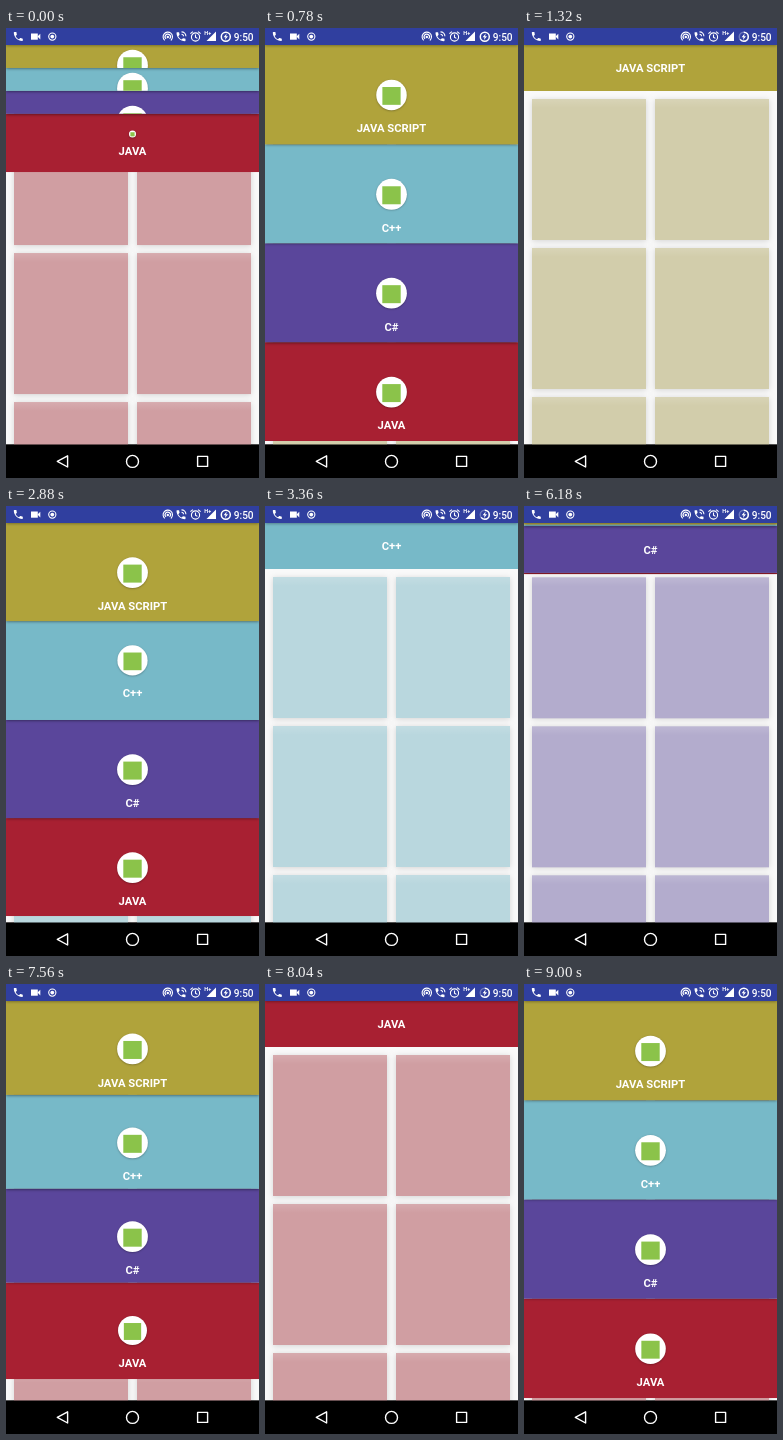
Recreate the animation shown at these times as an HTML page with a canvas. Size 253 by 450 pixels, loop 9060 ms.

```html
<!DOCTYPE html>
<html lang="en">
<head>
<meta charset="utf-8">
<title>Expanding panels</title>
<style>
  html, body { margin: 0; width: 100%; height: 100%; overflow: hidden; background: #000; }
  canvas { display: block; width: 253px; height: 450px; }
</style>
</head>
<body>
<canvas id="stage"></canvas>
<script>
const W = 253, H = 450, LOOP = 9060, STEP = 60;
const TOP = 17, BOTTOM = 416.5, CX = 126.5;
const FULL = 99.85, HEADER = 46;
const FONT = 'Roboto, Arial, sans-serif';

const panels = [
  { title: 'JAVA SCRIPT', color: '#b0a33b', card: '#d2cdab' },
  { title: 'C++', color: '#77b9c8', card: '#b9d7de' },
  { title: 'C#', color: '#5a469b', card: '#b3accd' },
  { title: 'JAVA', color: '#a82032', card: '#d09ea2' }
];

// start, end, panel, opening
const moves = [
  [-182, 390, 3, false],
  [745, 1310, 0, true], [1820, 2330, 0, false],
  [2835, 3365, 1, true], [3915, 4425, 1, false],
  [4995, 5630, 2, true], [6140, 6650, 2, false],
  [7474, 8020, 3, true], [8530, 9025, 3, false]
];

const canvas = document.getElementById('stage');
const ctx = canvas.getContext('2d');
const dpr = window.devicePixelRatio || 1;
canvas.width = W * dpr;
canvas.height = H * dpr;

const phonePath = new Path2D('M6.6 10.8c1.4 2.8 3.8 5.1 6.6 6.6l2.2-2.2c.3-.3.7-.4 1-.2 1.1.4 2.3.6 3.6.6.5 0 1 .4 1 1V20c0 .5-.5 1-1 1C10.6 21 3 13.4 3 4c0-.5.5-1 1-1h3.5c.5 0 1 .5 1 1 0 1.2.2 2.4.6 3.6.1.3 0 .7-.3 1z');

const ease = t => (1 - Math.cos(Math.PI * t)) / 2;

function stateAt(time) {
  const [start, end, selected, opening] = moves.filter(m => m[0] <= time).pop();
  const e = ease(Math.min(1, (time - start) / (end - start)));
  return { selected, opening, p: opening ? e : 1 - e };
}

function setShadow(alpha, blur, dy) {
  ctx.shadowColor = `rgba(0,0,0,${alpha})`;
  ctx.shadowBlur = blur * dpr;
  ctx.shadowOffsetY = dy * dpr;
}

function fillRect(color, x, y, w, h) {
  ctx.fillStyle = color;
  ctx.fillRect(x, y, w, h);
}

function disc(x, y, r) {
  ctx.beginPath();
  ctx.arc(x, y, r, 0, Math.PI * 2);
  ctx.fill();
}

function arc(x, y, r, from = 0, to = 2) {
  ctx.beginPath();
  ctx.arc(x, y, r, from * Math.PI, to * Math.PI);
  ctx.stroke();
}

function polygon(points) {
  ctx.beginPath();
  points.forEach(([x, y]) => ctx.lineTo(x, y));
  ctx.closePath();
}

function text(string, x, y, font, align) {
  ctx.font = `${font} ${FONT}`;
  ctx.textAlign = align;
  ctx.textBaseline = 'alphabetic';
  ctx.fillStyle = '#fff';
  ctx.fillText(string, x, y);
}

function drawCards(panel, p) {
  fillRect('#fafafa', 0, TOP, W, BOTTOM - TOP);
  for (let row = 0; row < 3; row++) {
    const y = 71 + row * 149 + 22 * (1 - p);
    const sheen = ctx.createLinearGradient(0, y, 0, y + 9);
    sheen.addColorStop(0, 'rgba(255,255,255,.14)');
    sheen.addColorStop(1, 'rgba(255,255,255,0)');
    for (const x of [8, 131]) {
      ctx.save();
      setShadow(0.15, 6, 1);
      fillRect(panel.card, x, y, 114, 141);
      ctx.restore();
      fillRect(sheen, x, y, 114, 9);
    }
  }
}

function drawIcon(y, scale) {
  if (scale < 0.02) return;
  ctx.save();
  ctx.translate(CX, y);
  ctx.scale(scale, scale);
  setShadow(0.3, 2, 0.7);
  ctx.fillStyle = '#fff';
  disc(0, 0, 15.4);
  setShadow(0, 0, 0);
  fillRect('#8bc34a', -9.2, -8, 18.4, 18);
  ctx.restore();
}

function drawPanel(i, y, h, state) {
  const { selected, opening, p } = state;
  if (h < 0.1) return;
  const isLast = i === panels.length - 1;
  ctx.save();
  if (!isLast) setShadow(0.5, 3, 0.8);
  fillRect(panels[i].color, 0, y, W, h);
  ctx.restore();

  const active = i === selected;
  let shift = 0;
  if (active && i === 1 && opening && p > 0) shift = -10.5 * (1 - p);
  if (i === selected - 1 && !opening) shift = 13 * p;
  // The icon slides up until its rim meets the top of the panel.
  const iconY = y + Math.max(50.3 - 39 * p, active ? 0 : 18) + shift;
  const titleY = y + 83.6 - (active ? 60.4 : 34) * p + shift;

  ctx.save();
  ctx.beginPath();
  ctx.rect(0, y, W, h);
  ctx.clip();
  drawIcon(iconY, active ? 1 - p : 1);
  text(panels[i].title, CX, titleY + 4, 'bold 11.25px', 'center');
  ctx.restore();
}

function drawPhone(x, y) {
  ctx.save();
  ctx.translate(x, y);
  ctx.scale(0.5, 0.5);
  ctx.fill(phonePath);
  ctx.restore();
}

function drawStatusBar(open) {
  ctx.save();
  setShadow(0.4, 3, 0.8);
  fillRect('#303f9f', 0, 0, W, TOP);
  ctx.restore();

  ctx.fillStyle = ctx.strokeStyle = '#fff';
  ctx.lineWidth = 1.1;
  drawPhone(6.3, 2.6);
  ctx.fillRect(25, 5.5, 6.8, 6.2);
  polygon([[31.5, 8.6], [34.3, 5.8], [34.3, 11.4]]);
  ctx.fill();
  arc(46.3, 8.6, 3.6);
  disc(46.3, 8.6, 1.9);

  // hotspot
  arc(161.8, 8.8, 4.7, 0.72, 2.28);
  arc(161.8, 8.8, 2.7, 0.72, 2.28);
  disc(161.8, 9, 1.2);

  // ongoing call
  drawPhone(169, 2.8);
  arc(175.5, 8.3, 2, 1.5, 2);
  arc(175.5, 8.3, 4.4, 1.5, 2);

  // alarm
  arc(189.5, 9, 4.1);
  ctx.beginPath();
  ctx.moveTo(189.5, 6.5);
  ctx.lineTo(189.5, 9.2);
  ctx.lineTo(191.4, 10.4);
  ctx.moveTo(184.4, 5.7);
  ctx.lineTo(186.9, 3.6);
  ctx.moveTo(194.6, 5.7);
  ctx.lineTo(192.1, 3.6);
  ctx.stroke();

  // signal
  text('H+', 198.3, 7, 'bold 5.5px', 'left');
  polygon([[200.5, 13], [210, 3.6], [210, 13]]);
  ctx.fill();

  // battery
  ctx.lineWidth = 1.5;
  if (open) {
    ctx.strokeStyle = 'rgba(255,255,255,.3)';
    arc(219.8, 8.7, 4.5);
    ctx.strokeStyle = '#fff';
    arc(219.8, 8.7, 4.5, 1.5, 2.8);
  } else {
    arc(219.8, 8.7, 4.5);
  }
  polygon([[220.7, 5.5], [217.6, 9.3], [219.5, 9.3], [219, 12], [222, 8.2], [220.1, 8.2]]);
  ctx.fill();

  text('9:50', 247.6, 12.5, '500 10.1px', 'right');
}

function drawNavBar() {
  fillRect('#000', 0, BOTTOM, W, H - BOTTOM);
  ctx.strokeStyle = '#fff';
  ctx.lineWidth = 1.4;
  ctx.lineJoin = 'round';
  polygon([[51.3, 433.4], [61.6, 427.8], [61.6, 439]]);
  ctx.stroke();
  arc(CX, 433.4, 6);
  ctx.strokeRect(191.6, 428.4, 10, 10);
}

function draw(time) {
  ctx.setTransform(dpr, 0, 0, dpr, 0, 0);
  const state = stateAt(time);
  const { selected, p } = state;
  drawCards(panels[selected], p);

  let y = TOP;
  const boxes = panels.map((_, i) => {
    const h = i === selected ? FULL + (HEADER - FULL) * p : FULL * (1 - p);
    const box = { i, y, h };
    y += h;
    return box;
  });

  // Bottom first, so each panel casts its shadow on the next one only.
  ctx.save();
  ctx.beginPath();
  ctx.rect(0, TOP, W, y - TOP);
  ctx.clip();
  boxes.reverse().forEach(box => drawPanel(box.i, box.y, box.h, state));
  ctx.restore();

  drawStatusBar(p > 0.9);
  drawNavBar();
}

const origin = performance.now();
function tick() {
  const time = (performance.now() - origin) % LOOP;
  draw(Math.floor(time / STEP) * STEP);
  requestAnimationFrame(tick);
}
tick();
</script>
</body>
</html>
```
